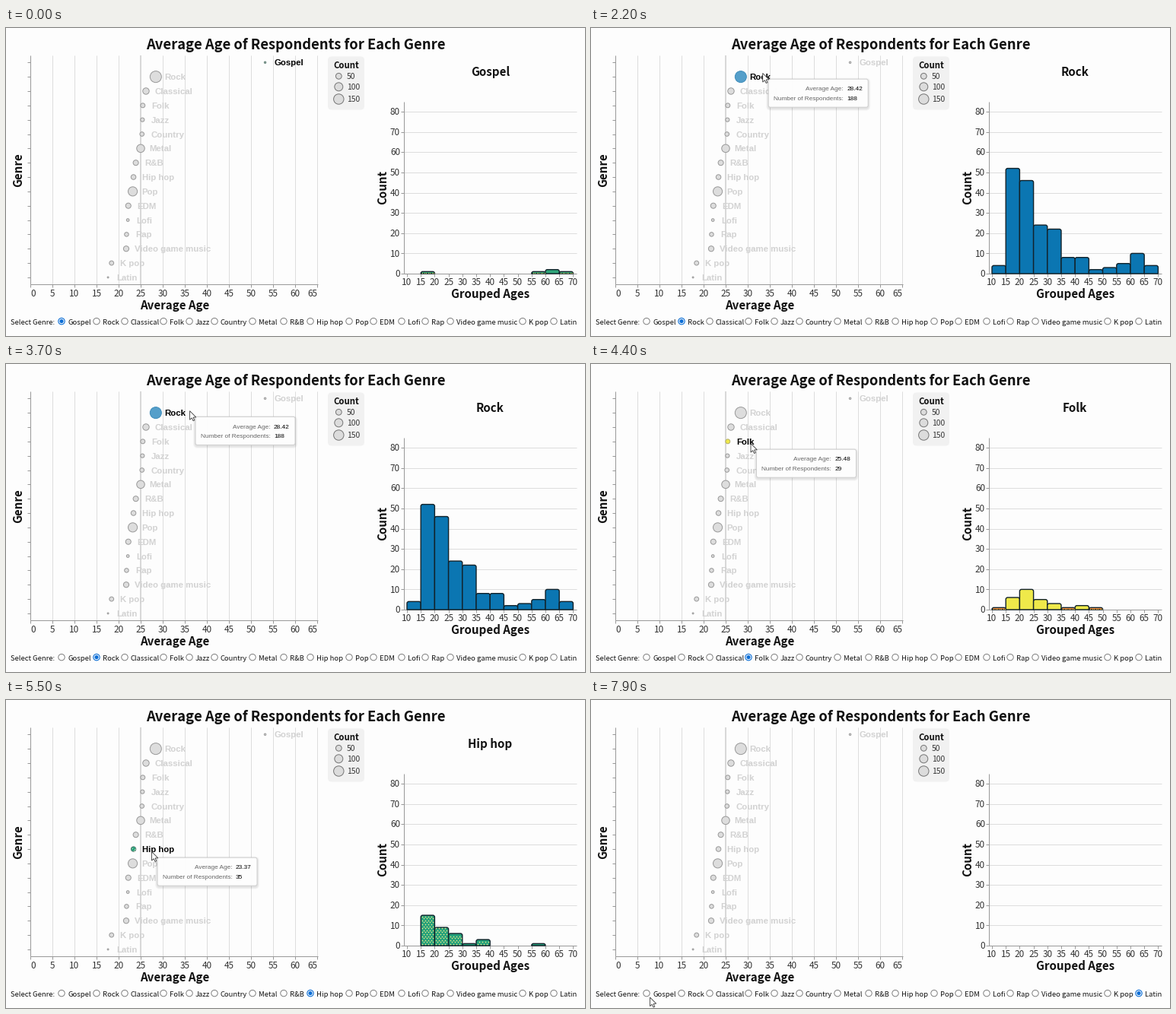
These frames come from a looping animation (761 px wide and 405 px high, 8000 ms). A matplotlib script:

```python
import numpy as np
import matplotlib.pyplot as plt
from matplotlib.animation import FuncAnimation
from matplotlib.patches import Circle, FancyBboxPatch, PathPatch, Polygon
from matplotlib.path import Path

W, H, DPI = 761, 405, 100
FRAMES, STEP = 80, 100
PT = 72 / DPI
UI, ARIAL = "Noto Sans CJK JP", "Liberation Sans"
HEADING, TICK = 15.1, 11.7
AXIS_Y, RADIO_Y = 336.8, 385.6

# name, average age, respondents, radio button x
GENRES = [
    ("Gospel", 53.2, 5, 73), ("Rock", 28.42, 188, 119), ("Classical", 26.2, 59, 156),
    ("Folk", 25.48, 29, 207), ("Jazz", 25.4, 22, 241), ("Country", 25.3, 26, 274),
    ("Metal", 25.0, 92, 324), ("R&B", 23.9, 41, 365), ("Hip hop", 23.37, 35, 400),
    ("Pop", 23.2, 122, 451), ("EDM", 22.2, 41, 483), ("Lofi", 22.1, 11, 520),
    ("Rap", 21.8, 25, 551), ("Video game music", 21.72, 43, 584),
    ("K pop", 18.4, 28, 679), ("Latin", 17.6, 3, 720),
]
NAMES = [g[0] for g in GENRES]
BARS = {
    "Gospel": [0, 1, 0, 0, 0, 0, 0, 0, 0, 1, 2, 1],
    "Rock": [4, 52, 46, 24, 22, 8, 8, 2, 3, 5, 10, 4],
    "Folk": [1, 6, 10, 5, 3, 1, 2, 1],
    "Hip hop": [0, 15, 9, 6, 1, 3, 0, 0, 0, 1],
    "Video game music": [5, 14, 17, 2, 1, 3, 1],
    "Latin": [],
}
COLORS = {"Gospel": "#2ea579", "Rock": "#0b76b2", "Folk": "#efe94a",
          "Hip hop": "#22a07a", "Video game music": "#c95400"}
# time and chosen genre
PICKS = [(0, "Gospel"), (1200, "Rock"), (4200, "Folk"), (5200, "Hip hop"),
         (6100, "Video game music"), (7300, "Latin")]
# time, pointer x, pointer y
POINTER = np.array([
    (400, 752, 6), (700, 470, 30), (1100, 221, 62), (1300, 222, 59.5), (2100, 224, 59.5),
    (2800, 254.5, 59), (3300, 254.5, 59), (3800, 240, 62), (4200, 210, 104.5),
    (4800, 210, 104.5), (5200, 191.5, 199.5), (5700, 191.5, 199.5), (6100, 176, 287),
    (6600, 176, 287), (6900, 73, 390), (7300, 718, 387), (7500, 708, 388.5),
    (7600, 708, 388.5), (7900, 77.5, 391)])


def age_x(a):
    return 32 + 5.8 * a


def row_y(i):
    return 45.3 + 18.84 * i


def radius(n):
    return 7.5 * np.sqrt(n / 188)


def bin_x(a):
    return 527 + (a - 10) * 3.64


def count_y(v):
    return 323 - 2.662 * v


fig = plt.figure(figsize=(W / DPI, H / DPI), dpi=DPI, facecolor="#fdfdfd")
ax = fig.add_axes([0, 0, 1, 1])
ax.set(xlim=(0, W), ylim=(H, 0))
ax.axis("off")


def label(x, y, s, size, ha="left", bold=False, color="#111111", font=UI, z=3, turn=False):
    opts = dict(rotation=90, rotation_mode="anchor") if turn else {}
    shift = 0.36 * size
    return ax.text(x + shift * turn, y + shift * (not turn), s, fontsize=size * PT, ha=ha,
                   va="baseline", weight="bold" if bold else "normal", color=color,
                   family=font, zorder=z, **opts)


def heading(x, y, s, size=HEADING, turn=False):
    return label(x, y, s, size, "center", bold=True, turn=turn)


def tick_label(x, y, n, ha="center"):
    label(x, y, str(n), TICK, ha, color="#333333")


def line(x0, y0, x1, y1, color="#dddddd", w=1.0, z=1):
    ax.plot([x0, x1], [y0, y1], color=color, lw=w * PT, zorder=z, solid_capstyle="butt")


def disc(x, y, r, fill, edge, w=1.0, z=2):
    return ax.add_patch(Circle((x, y), r, fc=fill, ec=edge, lw=w * PT, zorder=z))


def rounded(x, y, w, h, r, z, **style):
    return ax.add_patch(FancyBboxPatch((x, y), w, h, zorder=z,
                                       boxstyle=f"round,pad=0,rounding_size={r}", **style))


def dots(xs, ys, size, color, z):
    return ax.plot(xs, ys, "o", ms=size * PT, mfc=color, mec="none", zorder=z)[0]


def draw_scatter_frame():
    heading(380.5, 21, "Average Age of Respondents for Each Genre", 18.4)
    heading(221.5, 364.5, "Average Age")
    heading(16, 187, "Genre", turn=True)
    for a in range(0, 70, 5):
        x = age_x(a)
        if a:
            strong = a == 25
            line(x, 36, x, AXIS_Y, "#cccccc" if strong else "#dddddd", 1.5 if strong else 1)
        line(x, AXIS_Y, x, AXIS_Y + 4, "#999999")
        tick_label(x, 348.5, a, "left" if a == 0 else "right" if a == 65 else "center")
    line(32.3, 36, 32.3, AXIS_Y, "#999999")
    line(32, AXIS_Y, 409.5, AXIS_Y, "#999999")
    for i in range(len(GENRES)):
        line(28, row_y(i), 32, row_y(i), "#999999")


def draw_legend():
    rounded(423, 37.5, 48, 70, 5, 1, fc="#f1f1f1", ec="none")
    label(430, 48.5, "Count", 11.3, bold=True)
    for n, y in ((50, 63.3), (100, 77.3), (150, 93.5)):
        disc(437.3, y, radius(n), "#dcdcdc", "#777777")
        label(448, y, str(n), 10.3, color="#333333")


def draw_histogram_frame():
    for v in range(0, 90, 10):
        y = count_y(v)
        if v:
            line(523, y, 749.5, y)
        line(518.5, y, 523, y, "#999999")
        tick_label(518, y, v, "right")
    for a in range(10, 75, 5):
        line(bin_x(a), 323, bin_x(a), 327, "#999999")
        tick_label(bin_x(a), 334, a)
    line(522.8, 97, 522.8, 323, "#999999")
    line(523, 323, 750, 323, "#999999", z=2)
    heading(636.5, 350, "Grouped Ages")
    heading(494.5, 210, "Count", turn=True)


def bar_path(x0, x1, top, base):
    r = min(2.5, base - top)
    pts = [(x0, base), (x0, top + r), (x0, top), (x0 + r, top),
           (x1 - r, top), (x1, top), (x1, top + r), (x1, base), (x0, base)]
    codes = [Path.MOVETO, Path.LINETO, Path.CURVE3, Path.CURVE3,
             Path.LINETO, Path.CURVE3, Path.CURVE3, Path.LINETO, Path.CLOSEPOLY]
    return Path(pts, codes)


def draw_bars(name):
    parts = [heading(636.3, 57.5, name)] if BARS[name] else []
    for k, n in enumerate(BARS[name]):
        if not n:
            continue
        x0, x1, top = bin_x(10 + 5 * k), bin_x(15 + 5 * k), count_y(n)
        fill = "#f0873c" if name == "Folk" and n == 1 else COLORS[name]
        parts.append(ax.add_patch(PathPatch(bar_path(x0, x1, top, 323), fc=fill,
                                            ec="#12222a", lw=1.4 * PT, zorder=4)))
        if name == "Hip hop":
            grid = [(x, y) for j, y in enumerate(np.arange(321, top + 1, -2.6))
                    for x in np.arange(x0 + 2 + 2 * (j % 2), x1 - 1, 4)]
            if grid:
                parts.append(dots(*zip(*grid), 1.6, "#f0ea8c", 5))
        elif n == 1 and name in ("Gospel", "Folk"):
            xs = np.arange(x0 + 2, x1 - 1, 2.5)
            color = "#d9dc6a" if name == "Gospel" else "#f7c34a"
            parts.append(dots(xs, 0 * xs + 321.7, 1.3, color, 5))
    return parts


def draw_mark(i, name, avg, n, rx):
    """Return artists shown while the genre is idle and while it is chosen."""
    x, y, r = age_x(avg), row_y(i), radius(n)
    tag = (x + 11.5, y, name, 11.4)
    idle = [disc(x, y, r, "#dddddd", "#9a9a9a"),
            label(*tag, bold=True, color="#d2d2d2", font=ARIAL),
            disc(rx, RADIO_Y, 4.2, "white", "#767676", 0.9, 3)]
    if name not in BARS:
        return idle, []
    blue = "#0d6fd6"
    chosen = [disc(rx, RADIO_Y, 4.2, "white", blue, 1.1, 3),
              disc(rx, RADIO_Y, 2.6, blue, "none", 0, 4)]
    if name == "Latin":
        return idle[2:], chosen
    fill = {"Rock": "#559fca", "Gospel": "#8a9a94"}.get(name, COLORS[name])
    edge = {"Rock": "#3f8dbb", "Folk": "#b5b06a",
            "Video game music": "#c07a50"}.get(name, "#6b8a80")
    chosen += [disc(x, y, r, fill, edge), label(*tag, bold=True, color="black", font=ARIAL)]
    if name == "Hip hop":
        chosen.append(dots([x - 1.3, x + 1.4, x], [y - 1, y - .4, y + 1.6], 1.2, "#e8f0c0", 3))
    elif name == "Video game music":
        for dx in (-1.5, 1.3):
            chosen += ax.plot([x + dx] * 2, [y - 2.8, y + 2.8], color="#f7d9b8",
                              lw=PT, zorder=3)
    return idle, chosen


def draw_tooltip():
    shadow = [rounded(0, 0, 131 + 2 * k, 37 + 2 * k, 3 + k, 8, fc="black", ec="none", alpha=0.035)
              for k in (1, 2, 3)]
    box = rounded(0, 0, 131, 37, 2.5, 9, fc=(1, 1, 1, 0.96), ec="#cccccc", lw=0.9 * PT)
    texts = []
    for dy, s in ((12.2, "Average Age:"), (24.7, "Number of Respondents:")):
        texts.append((98.5, dy, label(0, 0, s, 8.3, "right", color="#666666", font=ARIAL, z=10)))
        texts.append((103, dy, label(0, 0, "", 8.3, color="black", font=ARIAL, z=10)))
    return shadow, box, texts


ARROW = np.array([(0, 0), (0, 11.6), (2.7, 9.2), (4.5, 13), (6.3, 12.2),
                  (4.6, 8.5), (8.2, 8.2)])

draw_scatter_frame()
draw_legend()
draw_histogram_frame()
label(6, 386.8, "Select Genre:", 9.4)
for g in GENRES:
    label(g[3] + 8, 386.8, g[0], 9.4)
marks = [draw_mark(i, *g) for i, g in enumerate(GENRES)]
bars = {name: draw_bars(name) for name in BARS}
shadow, tip_box, tip_texts = draw_tooltip()
arrow = ax.add_patch(Polygon(ARROW, closed=True, fc="white", ec="#444444",
                             lw=0.9 * PT, zorder=12))


def show(artists, on):
    for a in artists:
        a.set_visible(on)


def place_tooltip(x, y, active):
    inside = active and 32 < x < 409 and 36 < y < 337
    show(shadow + [tip_box] + [t for _, _, t in tip_texts], inside)
    if not inside:
        return
    near = min(range(len(GENRES)),
               key=lambda i: np.hypot(age_x(GENRES[i][1]) - x, row_y(i) - y))
    _, avg, n, _ = GENRES[near]
    left, top = x + 7.5, y + 7.7
    tip_box.set_bounds(left, top, 131, 37)
    for k, s in enumerate(shadow, 1):
        s.set_bounds(left - k, top - k + 1.5, 131 + 2 * k, 37 + 2 * k)
    for dx, dy, t in tip_texts:
        t.set_position((left + dx, top + dy + 3))
    tip_texts[1][2].set_text(f"{avg:g}")
    tip_texts[3][2].set_text(str(n))


def update(frame):
    t = frame * STEP
    pick = [name for start, name in PICKS if start <= t][-1]
    for name, (idle, chosen) in zip(NAMES, marks):
        show(idle, name != pick)
        show(chosen, name == pick)
    for name, parts in bars.items():
        show(parts, name == pick)
    times = POINTER[:, 0]
    k = int(np.clip(np.searchsorted(times, t, "right") - 1, 0, len(times) - 2))
    u = np.clip((t - times[k]) / (times[k + 1] - times[k]), 0, 1)
    x, y = POINTER[k, 1:] + (POINTER[k + 1, 1:] - POINTER[k, 1:]) * u * u * (3 - 2 * u)
    active = t >= times[0]
    arrow.set_visible(active)
    arrow.set_xy(ARROW + (x, y))
    place_tooltip(x, y, active)
    return []


anim = FuncAnimation(fig, update, frames=FRAMES, interval=STEP, repeat=True,
                     repeat_delay=0, init_func=lambda: update(0), blit=False)
plt.show()
```
